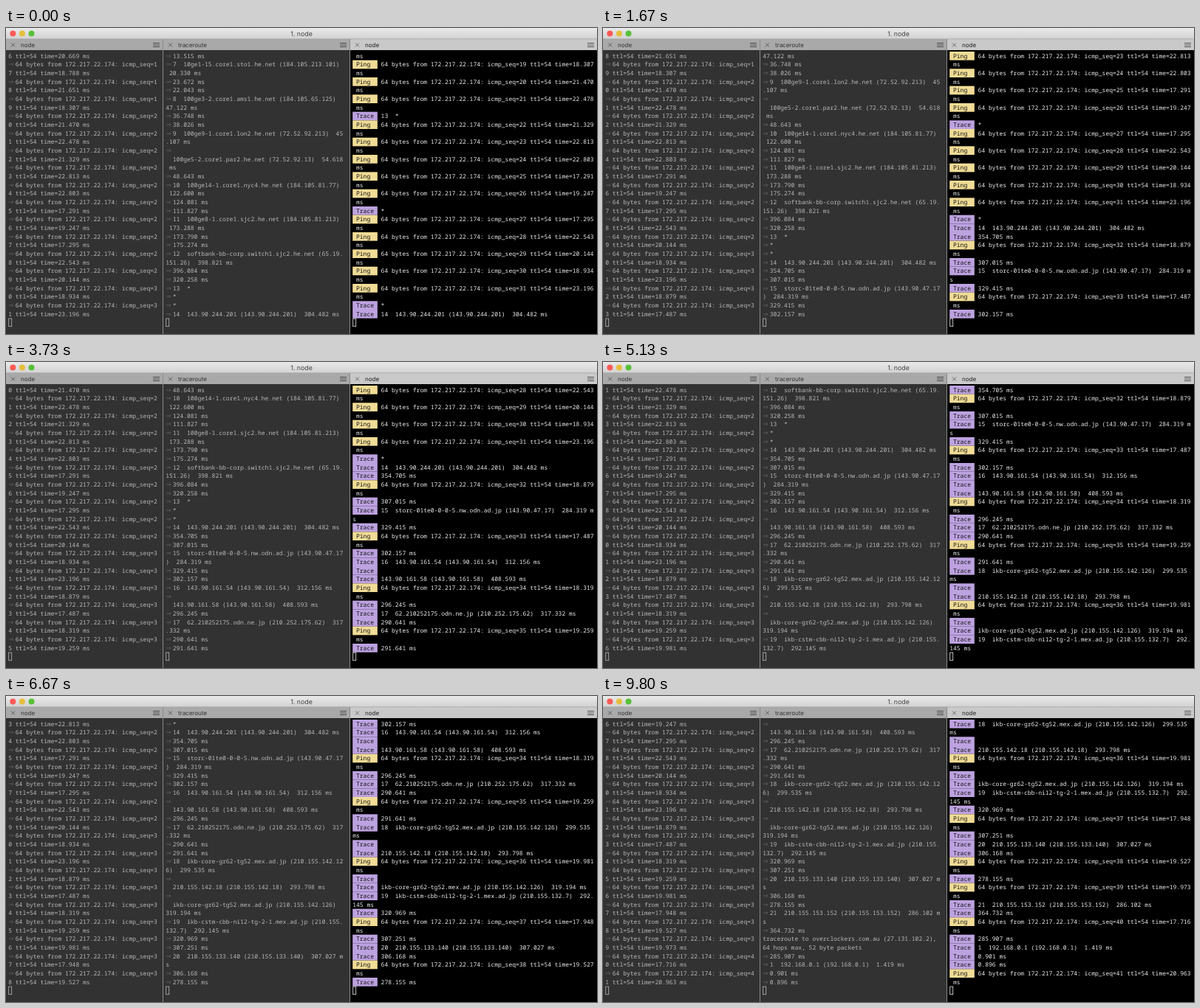
Recreate the animation shown at these times as an HTML page with a canvas. Size 800 by 415 pixels, loop 9870 ms.

```html
<!DOCTYPE html>
<html lang="en">
<head>
<meta charset="utf-8">
<title>1. node</title>
<style>
html, body { margin: 0; width: 100%; height: 100%; overflow: hidden; background: #fff; }
canvas { display: block; width: 800px; height: 415px; }
</style>
</head>
<body>
<canvas id="stage"></canvas>
<script>
const W = 800, H = 415, LOOP = 9870;
const ROWS = 31, ROW_H = 35 / 3, TOP = 32, COL = 4.8;
const MONO = '"Noto Sans Mono", "DejaVu Sans Mono", monospace';
const SANS = 'Inter, Roboto, sans-serif';

const canvas = document.getElementById('stage');
const ctx = canvas.getContext('2d');
const dpr = window.devicePixelRatio || 1;
canvas.width = W * dpr;
canvas.height = H * dpr;

// Round-trip times, one reply per second, starting at sequence 16.
const FIRST_SEQ = 16;
const pingTimes = `20.669 18.788 21.651 18.307 21.470 22.478 21.329 22.813 22.803
17.291 19.247 17.295 22.543 20.144 18.934 23.196 18.879 17.487 18.319 19.259 19.981
17.948 19.527 19.973 17.716 20.963`.split(/\s+/);

const pings = pingTimes.map((ms, i) => {
  const seq = FIRST_SEQ + i;
  return {
    at: 300 + 1004 * (seq - 32),
    tag: 'Ping',
    text: `64 bytes from 172.217.22.174: icmp_seq=${seq} ttl=54 time=${ms} ms`
  };
});

// "arrival|text"; "+" marks a second host on the same hop, "!" a line without prefix.
const traces = `-20000|13.515 ms
-20000|7  10ge1-15.core1.sto1.he.net (184.105.213.101)  20.330 ms
-20000|23.672 ms
-20000|22.043 ms
-20000|8  100ge3-2.core1.ams1.he.net (184.105.65.125)  47.122 ms
-20000|36.748 ms
-20000|38.026 ms
-20000|9  100ge9-1.core1.lon2.he.net (72.52.92.213)  45.107 ms
-20000|+100ge5-2.core1.par2.he.net (72.52.92.13)  54.618 ms
-20000|48.643 ms
-20000|10  100ge14-1.core1.nyc4.he.net (184.105.81.77)  122.600 ms
-20000|124.081 ms
-20000|111.827 ms
-20000|11  100ge8-1.core1.sjc2.he.net (184.105.81.213)  173.288 ms
-20000|173.790 ms
-20000|175.274 ms
-20000|12  softbank-bb-corp.switch1.sjc2.he.net (65.19.151.26)  398.821 ms
-20000|396.084 ms
-20000|320.258 ms
-10400|13  *
-5400|*
-400|*
-85|14  143.90.244.201 (143.90.244.201)  304.482 ms
270|354.705 ms
577|307.015 ms
861|15  storc-01te0-0-0-5.nw.odn.ad.jp (143.90.47.17)  284.319 ms
1190|329.415 ms
1492|302.157 ms
1800|16  143.90.161.54 (143.90.161.54)  312.156 ms
2213|+143.90.161.58 (143.90.161.58)  408.593 ms
2530|296.245 ms
2890|17  62.210252175.odn.ne.jp (210.252.175.62)  317.332 ms
3185|290.641 ms
3480|291.641 ms
3930|18  ikb-core-gr62-tg52.mex.ad.jp (210.155.142.126)  299.535 ms
4250|+210.155.142.18 (210.155.142.18)  293.798 ms
4600|+ikb-core-gr62-tg52.mex.ad.jp (210.155.142.126)  319.194 ms
4950|19  ikb-cstm-cbb-ni12-tg-2-1.mex.ad.jp (210.155.132.7)  292.145 ms
5271|320.969 ms
5578|307.251 ms
5920|20  210.155.133.140 (210.155.133.140)  307.027 ms
6226|306.168 ms
6504|278.155 ms
7740|21  210.155.153.152 (210.155.153.152)  286.102 ms
8105|364.732 ms
8391|!traceroute to overclockers.com.au (27.131.102.2), 64 hops max, 52 byte packets
8391|285.907 ms
8420|1  192.168.0.1 (192.168.0.1)  1.419 ms
8424|0.901 ms
8428|0.896 ms`.split('\n').map(line => {
  const [at, body] = line.split('|');
  const kind = '+!'.includes(body[0]) ? body[0] : '';
  return { at: +at, tag: 'Trace', kind, text: body.slice(kind.length) };
});

const TAG_FILL = { Ping: '#f0dc96', Trace: '#bda2e0' };

// Breaks one line into terminal rows of a fixed column count.
function wrap(at, text, cols, tag) {
  const rows = [];
  for (let i = 0; i === 0 || i < text.length; i += cols)
    rows.push({ at, text: text.slice(i, i + cols), tag: i ? '' : tag });
  return rows;
}

const pingRows = pings.flatMap(p => wrap(p.at, '⇒ ' + p.text, 42));

const traceRows = traces.flatMap(e => {
  if (e.kind === '!') return wrap(e.at, e.text, 50);
  if (e.kind === '+') return [...wrap(e.at, '⇒ ', 50), ...wrap(e.at, '  ' + e.text, 50)];
  return wrap(e.at, '⇒ ' + e.text, 50);
});

const mergedRows = [...pings, ...traces.filter(e => e.kind !== '!')]
  .sort((a, b) => a.at - b.at)
  .flatMap(e => {
    const indent = ' '.repeat(8);
    const rows = wrap(e.at, indent + e.text, 68, e.tag);
    return e.kind === '+' ? [...wrap(e.at, indent, 68, e.tag), ...rows] : rows;
  });

const panes = [
  { x: 0, w: 212, title: 'node', rows: pingRows },
  { x: 213, w: 252, title: 'traceroute', rows: traceRows },
  { x: 466, w: 334, title: 'node', rows: mergedRows, active: true }
];

function rect(x, y, w, h, fill) {
  ctx.fillStyle = fill;
  ctx.fillRect(x, y, w, h);
}

function label(text, x, y, font, fill) {
  ctx.font = font;
  ctx.fillStyle = fill;
  ctx.fillText(text, x, y);
}

function stroke(color, width, ...segments) {
  ctx.strokeStyle = color;
  ctx.lineWidth = width;
  ctx.beginPath();
  for (const [x1, y1, x2, y2] of segments) {
    ctx.moveTo(x1, y1);
    ctx.lineTo(x2, y2);
  }
  ctx.stroke();
}

function drawTitleBar() {
  const shade = ctx.createLinearGradient(0, 0, 0, 15);
  shade.addColorStop(0, '#e9e9e9');
  shade.addColorStop(1, '#d2d2d2');
  ctx.fillStyle = shade;
  ctx.beginPath();
  ctx.roundRect(0, 0, W, 15, [3, 3, 0, 0]);
  ctx.fill();
  ['#fc5b57', '#e5bf3c', '#57c038'].forEach((fill, i) => {
    ctx.fillStyle = fill;
    ctx.beginPath();
    ctx.arc(9.3 + 12.6 * i, 7.4, 4, 0, 7);
    ctx.fill();
  });
  ctx.textAlign = 'center';
  label('1. node', 400, 10.6, '8.8px ' + SANS, '#444');
  ctx.textAlign = 'left';
}

function drawTab({ x, w, title, active }) {
  const ink = active ? '#555' : '#4c4c4c';
  rect(x, 15, w, 15, active ? '#c9c9c9' : '#a9a9a9');
  stroke(ink, 0.8, [x + 7, 20.5, x + 12, 25.5], [x + 12, 20.5, x + 7, 25.5]);
  label(title, x + 20, 26, '8px ' + SANS, active ? '#222' : '#333');
  const r = x + w - 4;
  stroke(ink, 1, ...[20.5, 23, 25.5].map(y => [r - 9, y, r, y]));
}

function drawPane(pane, t) {
  const { x, w, rows, active } = pane;
  const left = x + 3.2, ink = active ? '#ececec' : '#b9b9b9';
  rect(x, 30, w, H - 30, active ? '#000' : '#323232');
  drawTab(pane);
  rows.filter(r => r.at <= t).slice(-ROWS).forEach((row, i) => {
    const y = TOP + i * ROW_H, base = y + 8.7;
    if (row.tag) {
      rect(left, y, 7 * COL, ROW_H, TAG_FILL[row.tag]);
      label(row.tag, left + COL, base, '8px ' + MONO, '#111');
    }
    if (row.text[0] === '⇒')
      label('⇒', left, base, '9px "DejaVu Sans", sans-serif', '#5c5c5c');
    const text = row.text.replace('⇒', ' ');
    const start = text.search(/\S/);
    if (start >= 0) label(text.slice(start), left + start * COL, base, '8px ' + MONO, ink);
  });
  ctx.strokeStyle = ink;
  ctx.lineWidth = 0.8;
  ctx.strokeRect(left + 0.5, TOP + ROWS * ROW_H + 0.4, 4, ROW_H - 1);
}

function draw() {
  const t = performance.now() % LOOP;
  ctx.setTransform(dpr, 0, 0, dpr, 0, 0);
  ctx.textRendering = 'geometricPrecision';
  rect(0, 0, W, H, '#fff');
  drawTitleBar();
  panes.forEach(p => drawPane(p, t));
  for (const x of [212, 465]) rect(x, 15, 1, H - 15, '#8a8a8a');
  rect(0, 14.5, W, 0.7, '#a0a0a0');
  requestAnimationFrame(draw);
}
requestAnimationFrame(draw);
</script>
</body>
</html>
```
